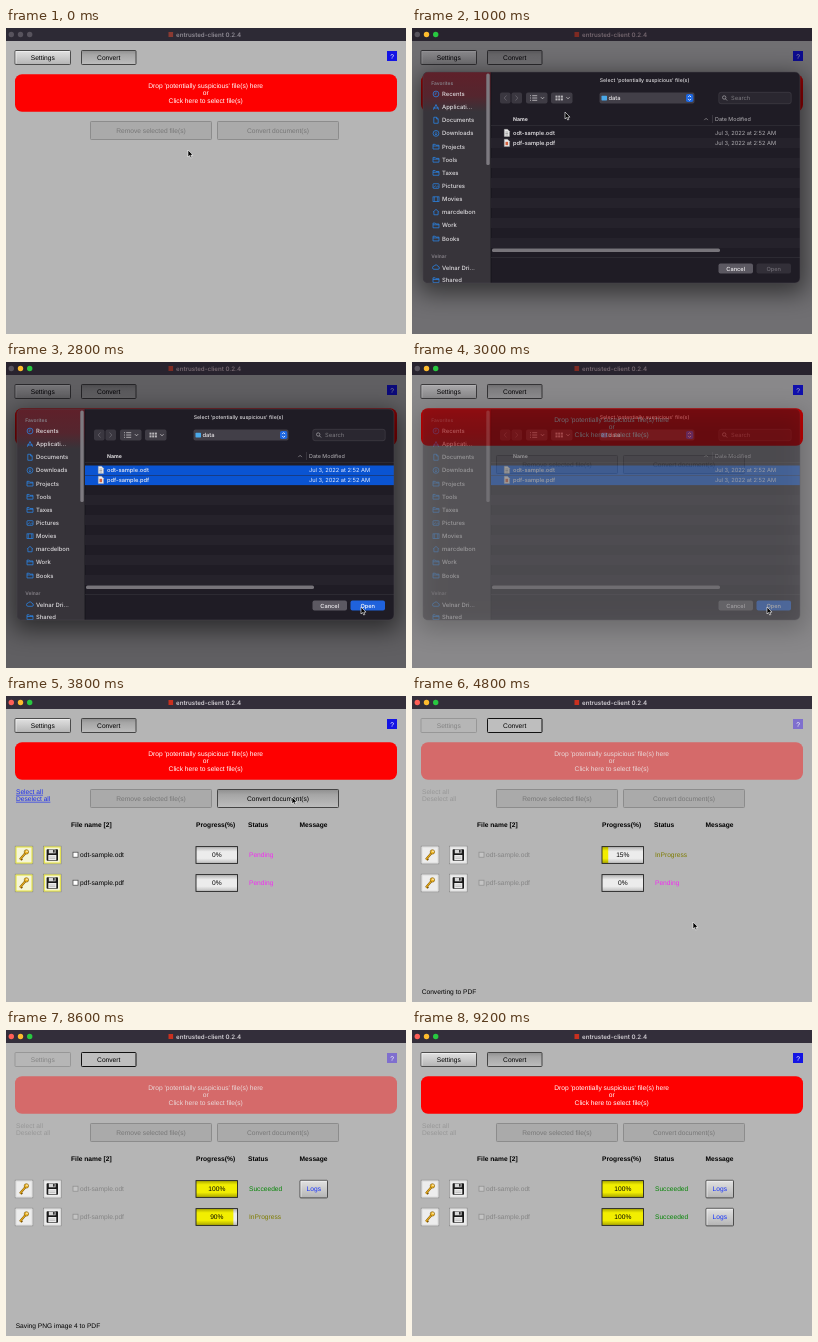
Recreate the animation shown at these times as an HTML page. Size 400 by 306 pixels, loop 9600 ms.

```html
<!DOCTYPE html>
<html lang="en">
<head>
<meta charset="utf-8">
<title>entrusted-client</title>
<style>
  html, body { margin: 0; width: 100%; height: 100%; overflow: hidden; background: #b4b4b4; }
  svg { display: block; width: 400px; height: 306px; }
  text { font: 6.65px "Liberation Sans", Arial, sans-serif; text-rendering: geometricPrecision; white-space: pre; }
  .ui text { font-family: Inter, Roboto, sans-serif; }
</style>
</head>
<body>
<svg viewBox="0 0 400 306">
  <defs>
    <linearGradient id="up" x2="0" y2="1">
      <stop stop-color="#e2e2e2"/><stop offset=".5" stop-color="#cbcbcb"/><stop offset="1" stop-color="#b4b4b4"/>
    </linearGradient>
    <linearGradient id="down" x2="0" y2="1">
      <stop stop-color="#8f8f8f"/><stop offset=".3" stop-color="#a6a6a6"/><stop offset="1" stop-color="#bdbdbd"/>
    </linearGradient>
    <linearGradient id="track" x2="0" y2="1">
      <stop stop-color="#b0b0b0"/><stop offset=".3" stop-color="#ececec"/><stop offset=".7" stop-color="#ececec"/><stop offset="1" stop-color="#bcbcbc"/>
    </linearGradient>
    <linearGradient id="fill" x2="0" y2="1">
      <stop stop-color="#aaa800"/><stop offset=".25" stop-color="#f2ee00"/><stop offset=".7" stop-color="#f2ee00"/><stop offset="1" stop-color="#a8a400"/>
    </linearGradient>
    <linearGradient id="glow" x2="0" y2="1">
      <stop stop-color="#a00010" stop-opacity=".38"/><stop offset=".6" stop-color="#a00010" stop-opacity=".28"/><stop offset="1" stop-color="#a00010" stop-opacity="0"/>
    </linearGradient>
    <filter id="soft" x="-20%" y="-30%" width="140%" height="160%"><feGaussianBlur stdDeviation="12"/></filter>
    <clipPath id="sheet"><rect x="11" y="47" width="377" height="211" rx="5"/></clipPath>
    <clipPath id="body"><rect y="13" width="400" height="293"/></clipPath>
  </defs>
  <g id="scene"></g>
</svg>
<script>
const LOOP = 9600, STEP = 200;
const scene = document.getElementById('scene');

// Timelines: [start ms, values...]; each entry holds until the next.
const pointer = [
  [0, 182, 122], [200, 165, 100], [400, 153, 84], [1200, 147, 91], [1400, 134, 99],
  [1600, 120, 105], [1800, 113, 107], [2200, 117, 117], [2400, 170, 152], [2600, 300, 222],
  [2800, 355, 245], [3200, 350, 232], [3400, 328, 178], [3600, 300, 122], [3800, 286, 101],
  [4400, 286, 128], [4600, 284, 172], [4800, 281, 226], [5000, 278, 278], [5200, 278, 320]
];
const sheet = [
  [0, 0, 0, 0], [800, .2, .45, -6], [1000, .39, 1, -3], [1200, .48, 1, 0],
  [3000, .25, .4, 0], [3200, 0, 0, 0]
];
const jobs = [
  [0, 0, 0, ''],
  [4400, 0, 0, 'Starting document processing'],
  [4600, 5, 0, 'Converting to PDF'],
  [4800, 15, 0, 'Converting to PDF'],
  [5000, 20, 0, 'Saving PDF page 1 to PNG'],
  [5200, 25, 0, 'Saving PDF page 2 to PNG'],
  [5600, 32, 0, 'Saving PDF page 3 to PNG'],
  [5800, 42, 0, 'Saving PDF page 4 to PNG'],
  [6000, 52, 0, 'Saving PNG image 1 to PDF'],
  [6200, 62, 0, 'Saving PNG image 2 to PDF'],
  [6400, 72, 0, 'Saving PNG image 3 to PDF'],
  [6600, 82, 0, 'Saving PNG image 4 to PDF'],
  [6800, 96, 0, 'Combining PDF pages'],
  [7000, 100, 0, 'Starting document processing'],
  [7200, 100, 10, 'Saving PDF page 1 to PNG'],
  [7400, 100, 25, 'Saving PDF page 2 to PNG'],
  [7800, 100, 40, 'Saving PDF page 4 to PNG'],
  [8000, 100, 52, 'Saving PNG image 1 to PDF'],
  [8200, 100, 65, 'Saving PNG image 2 to PDF'],
  [8400, 100, 78, 'Saving PNG image 3 to PDF'],
  [8600, 100, 90, 'Saving PNG image 4 to PDF'],
  [8800, 100, 96, 'Combining PDF pages'],
  [9000, 100, 100, 'Combining PDF pages'],
  [9200, 100, 100, '']
];
const at = (line, t) => line.filter(e => e[0] <= t).pop().slice(1);

const rect = (x, y, w, h, fill, more = '') =>
  `<rect x="${x}" y="${y}" width="${w}" height="${h}" fill="${fill}" ${more}/>`;
const path = (d, stroke, more = '') =>
  `<path d="${d}" fill="none" stroke="${stroke}" ${more}/>`;
const disc = (x, y, r, fill, more = '') =>
  `<circle cx="${x}" cy="${y}" r="${r}" fill="${fill}" ${more}/>`;
const text = (x, y, s, fill = '#000', style = '', more = '') =>
  `<text x="${x}" y="${y}" fill="${fill}" style="${style}" ${more}>${s}</text>`;
const mid = (x, y, s, fill, style) => text(x, y, s, fill, style, 'text-anchor="middle"');
const size = (px, weight = 400) => `font-size:${px}px;font-weight:${weight}`;
const bold = 'font-weight:700';

// Fill, border and label colour of each button state.
const looks = {
  up: ['url(#up)', '#4c4c4c', '#000'],
  down: ['url(#down)', '#444', '#000'],
  focus: ['#bebebe', '#111', '#000'],
  off: ['#b6b6b6', '#979797', '#858585'],
  flat: ['#aaaaaa', '#8c8c8c', '#777']
};
function button(x, y, w, h, label, mode, ink) {
  const [fill, edge, color] = looks[mode];
  return rect(x + .5, y + .5, w - 1, h - 1, fill, `stroke="${edge}" rx=".8"`) +
    (mode === 'up' ? path(`M${x + 1.5} ${y + h - 1.5}V${y + 1.5}H${x + w - 1.5}`, '#f4f4f4', 'stroke-width=".7"') : '') +
    mid(x + w / 2, y + h / 2 + 2.3, label, ink || color);
}

function titleBar(t) {
  const live = t >= 800, busy = live && t < 3200;
  const grey = '#57535d';
  const lamps = [live && !busy ? '#ff5f57' : grey, live ? '#febc2e' : grey, live ? '#28c840' : grey];
  const [bar, mark, ink] = busy ? ['#28232e', '#7e2a22', '#75676f'] :
    live ? ['#332e3a', '#c9301f', '#d2ced4'] : ['#2d2a35', '#8a3a32', '#8f8b94'];
  return rect(0, 0, 400, 13, bar) +
    lamps.map((c, i) => disc(5.3 + 9.2 * i, 6.5, 2.7, c)).join('') +
    rect(162.5, 4, 4.6, 5, mark) +
    `<g class="ui">${text(170, 8.8, 'entrusted-client 0.2.4', ink, size(6.15, 600))}</g>`;
}

const key = (x, y) =>
  path(`M${x + 6} ${y + 14.5}L${x + 11.5} ${y + 8}M${x + 6.5} ${y + 13.5}l1.8 1.5`, '#7a5200', 'stroke-width="2"') +
  path(`M${x + 6} ${y + 14.5}L${x + 11.5} ${y + 8}`, '#e0a820', 'stroke-width="1.2"') +
  disc(x + 12.4, y + 6.9, 2.2, '#f0b92c', 'stroke="#7a5200" stroke-width=".6"') + disc(x + 13, y + 6.2, .7, '#fff');

const floppy = (x, y) =>
  rect(x + 4.3, y + 4.3, 11.4, 11.4, '#1a1a1a', 'rx=".8"') + rect(x + 6.5, y + 4.5, 6.8, 3.8, '#d8d8d8') +
  rect(x + 10.8, y + 5, 1.5, 2.6, '#222') + rect(x + 6, y + 10, 8, 5.2, '#eee') +
  path(`M${x + 7} ${y + 12}h6m-6 1.6h6`, '#999', 'stroke-width=".5"');

function fileRow(y, name, pct, started, off) {
  const edge = off ? '#dcdcdc' : '#e6e337';
  const box = x => rect(x + 1.2, y + 1.2, 17.6, 17.6, off ? '#ededed' : '#f5f5d8', 'stroke="#808080" stroke-width=".7"') +
    rect(x + 2, y + 2, 16, 16, 'none', `stroke="${edge}"`);
  const [label, ink] = pct === 100 ? ['Succeeded', '#078607'] : started ? ['InProgress', '#7e7c00'] : ['Pending', '#f22cf2'];
  return box(8) + key(8, y) + box(36.3) + floppy(36.3, y) +
    rect(67, y + 7.2, 5, 5, off ? '#c4c4c4' : '#fff', `stroke="${off ? '#8c8c8c' : '#444'}" stroke-width=".7"`) +
    text(74, y + 12.2, name, off ? '#858585' : '#000') +
    rect(190, y + 1.6, 41.5, 16.8, 'url(#track)') + rect(190, y + 1.6, .415 * pct, 16.8, 'url(#fill)') +
    rect(190, y + 1.6, 41.5, 16.8, 'none', 'stroke="#222" stroke-width=".9"') +
    mid(210.8, y + 12.4, pct + '%') + text(243, y + 12.2, label, ink) +
    (pct === 100 ? button(293.5, y + .8, 28.5, 18.6, 'Logs', 'up', '#1430ff') : '');
}

function app(t) {
  const [a, b, note] = at(jobs, t);
  const listed = t >= 3200, ran = t >= 4200, off = ran && t < 9200;
  const lineInk = off ? '#eadada' : '#fff';
  let out = rect(0, 13, 400, 293, '#b5b5b5') +
    button(8.5, 22, 56.5, 15, 'Settings', off ? 'off' : 'up') +
    button(75, 22, 55.5, 15, 'Convert', off ? 'focus' : 'down') +
    rect(381, 23, 10, 10, off ? '#7f6fce' : '#1414e4') + mid(386, 30.5, '?', '#fff') +
    rect(9, 46.3, 382, 37.4, off ? '#d56a6a' : '#fe0000', 'rx="7"') +
    ["Drop 'potentially suspicious' file(s) here", 'or', 'Click here to select file(s)']
      .map((s, i) => mid(199.7, 59.8 + 7.5 * i, s, lineInk)).join('') +
    button(84, 93, 122, 19, 'Remove selected file(s)', 'flat') +
    button(211, 93, 122, 19, 'Convert document(s)', !listed || ran ? 'flat' : t >= 3800 ? 'down' : 'up');
  if (listed) {
    const link = ran ? '#979797' : '#1a2cf0';
    out += ['Select all', 'Deselect all'].map((s, i) =>
      text(10, 97.8 + 7 * i, s, link, ran ? '' : 'text-decoration:underline')).join('') +
      [[65, 'File name [2]'], [190, 'Progress(%)'], [242, 'Status'], [293.5, 'Message']]
        .map(([x, s]) => text(x, 130.7, s, '#000', bold)).join('') +
      fileRow(149, 'odt-sample.odt', a, t >= 4400, ran) +
      fileRow(177, 'pdf-sample.pdf', b, t >= 7000, ran) +
      text(9.7, 298.2, note);
  }
  return out;
}

const BLUE = '#2a86ea';
const folder = (x, y) =>
  path(`M${x - 3} ${y - 2.2}h2.2l.8.9h3v3.8h-6zm0 1.7h6`, BLUE, 'stroke-width=".75"');
const icons = {
  clock: (x, y) => disc(x, y, 2.9, 'none', `stroke="${BLUE}" stroke-width=".75"`) + path(`M${x} ${y - 1.7}v1.9h-1.4`, BLUE, 'stroke-width=".7"'),
  apps: (x, y) => path(`M${x - 2.6} ${y + 2.6}L${x} ${y - 2.6}l2.6 5.2M${x - 3} ${y + .9}h6`, BLUE, 'stroke-width=".75"'),
  doc: (x, y) => path(`M${x - 2.2} ${y - 3}h2.8l1.6 1.7v4.3h-4.4zM${x + .6} ${y - 3}v1.7h1.6`, BLUE, 'stroke-width=".75"'),
  down: (x, y) => disc(x, y, 2.9, 'none', `stroke="${BLUE}" stroke-width=".75"`) + path(`M${x} ${y - 1.7}v3.2m-1.2-1.2l1.2 1.2 1.2-1.2`, BLUE, 'stroke-width=".7"'),
  image: (x, y) => rect(x - 3, y - 2.2, 6, 4.6, 'none', `stroke="${BLUE}" stroke-width=".75" rx=".6"`) + path(`M${x - 2.8} ${y + 1.8}l2-2 1.5 1.3 1-.9 1.2 1.2`, BLUE, 'stroke-width=".6"'),
  film: (x, y) => rect(x - 3, y - 2.2, 6, 4.6, 'none', `stroke="${BLUE}" stroke-width=".75"`) + path(`M${x - 1.6} ${y - 2.2}v4.6m3.2-4.6v4.6`, BLUE, 'stroke-width=".6"'),
  home: (x, y) => path(`M${x - 3} ${y}l3-2.8 3 2.8m-5.1-.6v3.2h4.2v-3.2`, BLUE, 'stroke-width=".75"'),
  cloud: (x, y) => path(`M${x - 2} ${y + 1.8}h4a1.4 1.4 0 0 0 0-2.8a2 2 0 0 0-3.8-.4a1.6 1.6 0 0 0-.2 3.2z`, BLUE, 'stroke-width=".75"'),
  folder
};
const places = [
  ['clock', 'Recents'], ['apps', 'Applicati…'], ['doc', 'Documents'], ['down', 'Downloads'],
  ['folder', 'Projects'], ['folder', 'Tools'], ['folder', 'Taxes'], ['image', 'Pictures'],
  ['film', 'Movies'], ['home', 'marcdelbon'], ['folder', 'Work'], ['folder', 'Books']
];
const place = ([icon, label], y) => icons[icon](24, y) + text(30, y + 2.1, label, '#dedcdf', size(5.9, 500));
const heading = (label, y) => text(19.3, y + 1.8, label, '#858088', size(4.9, 600));
const chevron = (x, y) => path(`M${x - 1.6} ${y - .8}l1.6 1.6 1.6-1.6`, '#c9c7cb', 'stroke-width=".8"');

function sidebar() {
  return rect(11, 47, 68, 212, '#37343a') + rect(11, 47, 68, 40, 'url(#glow)') +
    path('M79 47V258', '#141218', 'stroke-width=".7"') +
    heading('Favorites', 58) + places.map((p, i) => place(p, 69 + 13.13 * i)).join('') +
    heading('Velnar', 231.5) + place(['cloud', 'Velnar Dri…'], 242.5) + place(['folder', 'Shared'], 255) +
    rect(74.3, 48.5, 3.4, 91.5, '#7d7a80', 'rx="1.6"');
}

function toolbar() {
  const pad = (x, w, c) => rect(x, 67.5, w, 11, c, 'rx="2"');
  const tiles = [0, 1, 2].map(c => [0, 1].map(r => rect(143.5 + 2.7 * c, 70.6 + 2.8 * r, 2, 2, '#b9b7bb')).join('')).join('');
  return mid(232.5, 57, "Select 'potentially suspicious' file(s)", '#dedcdf', size(5.2, 500)) +
    pad(88, 10.5, '#3a3740') + pad(99.5, 10.5, '#3a3740') +
    path('M94.5 70.5l-2.3 2.5 2.3 2.5m9-5l2.3 2.5-2.3 2.5', '#6b6870', 'stroke-width=".8"') +
    pad(114, 21.5, '#3f3c45') + path('M118 70.7h1m1.2 0h5M118 73h1m1.2 0h5M118 75.3h1m1.2 0h5', '#c9c7cb', 'stroke-width=".8"') + chevron(130.5, 73) +
    pad(139, 21.5, '#3f3c45') + tiles + chevron(156, 73) +
    pad(187.5, 95, '#423f48') + rect(189.5, 70.8, 5.5, 4.6, '#4aa8e8', 'rx=".6"') + text(196.4, 75, 'data', '#e6e4e7', size(5.8, 500)) +
    rect(274, 69, 7.3, 8, '#1d66e0', 'rx="1.8"') + path('M276.1 72.1l1.5-1.5 1.5 1.5m-3 1.8l1.5 1.5 1.5-1.5', '#fff', 'stroke-width=".8"') +
    rect(306.8, 67.3, 72.4, 11.4, '#2a2730', 'rx="2.2" stroke="#45424a" stroke-width=".6"') +
    disc(312.2, 72.5, 1.7, 'none', 'stroke="#aaa8ac" stroke-width=".7"') + path('M313.4 73.8l1.7 1.7', '#aaa8ac', 'stroke-width=".7"') +
    text(319, 75, 'Search', '#7d7b80', size(5.8));
}

function files(t) {
  const picked = [t >= 2000, t >= 2200];
  let out = text(101, 96, 'Name', '#e2e0e3', size(5.2, 700)) + path('M292.3 95.1l1.8-1.8 1.8 1.8', '#9b999d', 'stroke-width=".7"') +
    path('M300.5 90v8', '#434048', 'stroke-width=".7"') + text(303, 96, 'Date Modified', '#b5b3b7', size(5.4)) +
    path('M79 100.5H388', '#37343c', 'stroke-width=".6"');
  for (let i = 0; i < 12; i++) if (i % 2) out += rect(79, 103 + 10 * i, 309, 10, '#25222b');
  ['odt', 'pdf'].forEach((ext, i) => {
    const y = 103 + 10 * i, on = picked[i];
    if (on) out += rect(79, y + .5, 309, 9.6, '#0a54d2');
    out += path(`M92.3 ${y + 1.3}h3.2l2 2v5.2h-5.2z`, '#aaa', 'style="fill:#ececec" stroke-width=".4"') +
      (ext === 'odt' ? path(`M93.4 ${y + 4}h2.8m-2.8 1.5h2.8m-2.8 1.5h2.8`, '#777', 'stroke-width=".6"') : rect(93.5, y + 3.8, 2.6, 3.4, '#d2603e')) +
      text(101, y + 7.1, `${ext}-sample.${ext}`, '#f0eef1', size(5.7, 500)) +
      text(303, y + 7, 'Jul 3, 2022 at 2:52 AM', on ? '#e4ecff' : '#aeacb0', size(5.7));
  });
  return out + rect(80, 223.6, 228, 3.4, '#77747a', 'rx="1.6"') + path('M79 232.5H388', '#37343c', 'stroke-width=".6"') +
    rect(306.5, 238.5, 34.5, 10, '#5c5962', 'rx="2"') + mid(323.7, 245.6, 'Cancel', '#f0eef1', size(5.7, 500)) +
    rect(344.5, 238.5, 34.5, 10, picked[0] ? '#1f62dc' : '#322f38', 'rx="2"') +
    mid(361.7, 245.6, 'Open', picked[0] ? '#fff' : '#6d6a72', size(5.7, 500));
}

function dialog(t) {
  const [dim, alpha, dy] = at(sheet, t);
  if (!dim) return '';
  return rect(0, 13, 400, 293, '#040008', `opacity="${dim}"`) +
    `<g clip-path="url(#body)">${rect(7, 50 + dy, 386, 218, '#000', `opacity="${.55 * alpha}" filter="url(#soft)"`)}</g>` +
    `<g class="ui" opacity="${alpha}" transform="translate(0 ${dy})"><g clip-path="url(#sheet)">` +
    rect(11, 47, 378, 212, '#1f1c25') + sidebar() + toolbar() + files(t) + '</g>' +
    rect(11, 47, 377, 211, 'none', 'rx="5" stroke="#4a474e" stroke-width=".5"') + '</g>';
}

function arrow(t) {
  const [x, y] = at(pointer, t);
  return `<path d="M${x} ${y}v7l1.6-1.5 1.1 2.5 1.2-.5-1.1-2.4h2.2z" stroke="#fff" stroke-width=".6"/>`;
}

let shown = -1;
function tick(now) {
  const t = Math.floor(now % LOOP / STEP) * STEP;
  if (t !== shown) {
    shown = t;
    scene.innerHTML = app(t) + titleBar(t) + dialog(t) + arrow(t);
  }
  requestAnimationFrame(tick);
}
tick(performance.now());
</script>
</body>
</html>
```
